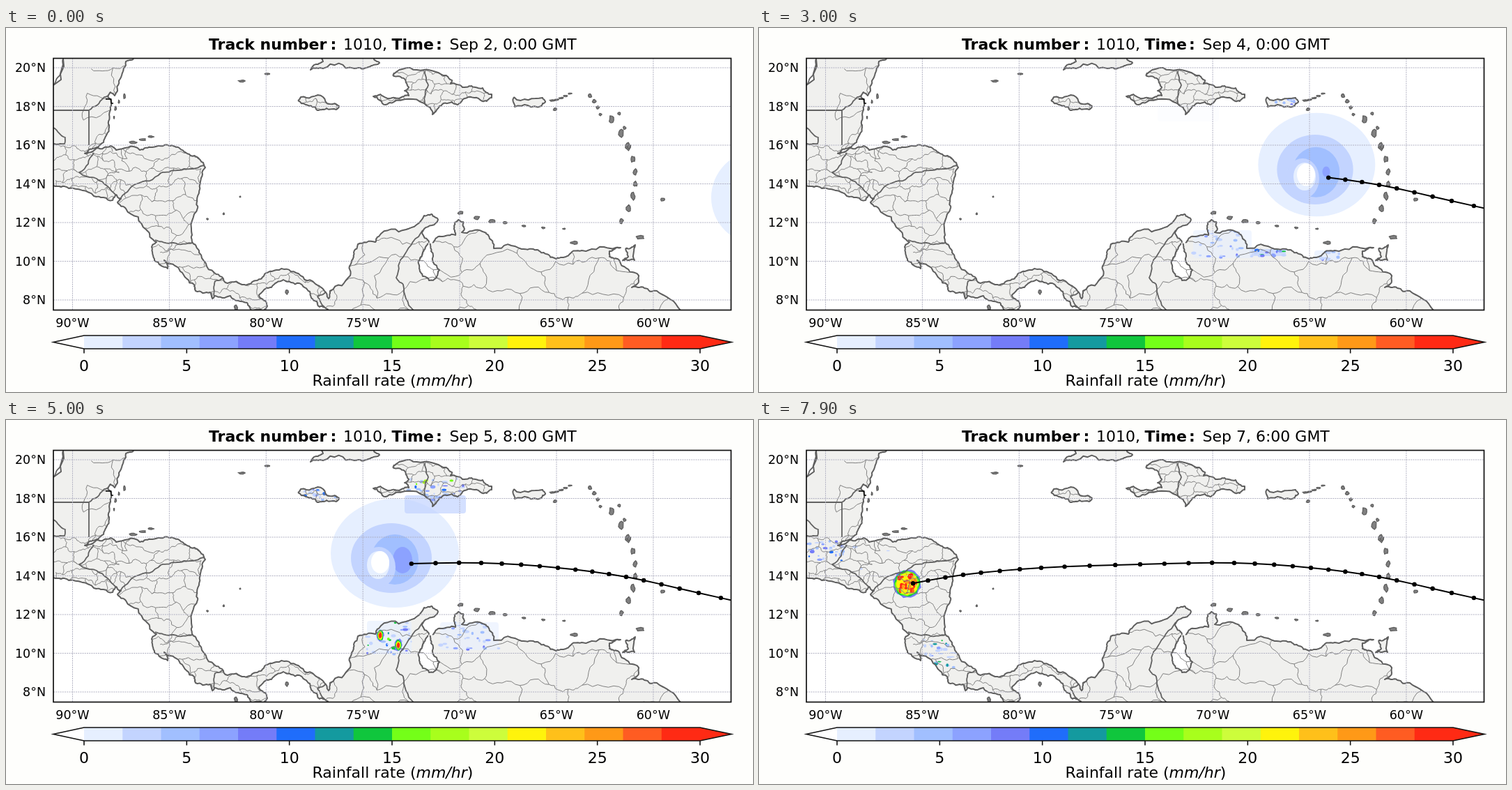
Animation of 1072 by 522 pixels, one loop 8000 ms. Source, as an HTML page with a canvas:

```html
<!DOCTYPE html>
<html lang="en">
<head>
<meta charset="utf-8">
<title>Rainfall along a storm track</title>
<style>
html, body { margin: 0; width: 100%; height: 100%; overflow: hidden; background: #fefefc; }
canvas { display: block; }
</style>
</head>
<body>
<canvas id="stage" width="1072" height="522"></canvas>
<script>
const ctx = document.getElementById("stage").getContext("2d");
const MAP = { x: 68, y: 43.5, w: 972.5, h: 361 };
const FONT = '"DejaVu Sans", sans-serif';
const RAMP = ["#e6efff", "#c3d4ff", "#a1bfff", "#8ca2ff", "#747cf8", "#1f6dfb", "#149a9f", "#10c63d",
  "#74ff18", "#a8fe1c", "#cdfd3b", "#fff30c", "#ffc01a", "#ff9917", "#ff5c22", "#ff2a14"];

// ---------- helpers ----------
function random(seed) {
  return () => {
    seed = (seed + 0x6D2B79F5) | 0;
    let t = Math.imul(seed ^ (seed >>> 15), 1 | seed);
    t ^= t + Math.imul(t ^ (t >>> 7), 61 | t);
    return ((t ^ (t >>> 14)) >>> 0) / 4294967296;
  };
}
const clamp = v => Math.min(1, Math.max(0, v));
const mix = (a, b, f) => a + (b - a) * f;
const ramp = (from, to, v) => clamp((v - from) / (to - from));
const points = text => text.trim().split(/\s+/).map(p => p.split(",").map(Number));

// Roughens a polyline by midpoint displacement; the given points stay put.
function roughen(pts, amount, rng, rounds = 3) {
  for (let r = 0; r < rounds; r++) {
    pts = pts.flatMap((p, i) => {
      if (!i) return [p];
      const q = pts[i - 1], k = (rng() - 0.5) * 2 * amount;
      return [[(p[0] + q[0]) / 2 - (p[1] - q[1]) * k, (p[1] + q[1]) / 2 + (p[0] - q[0]) * k], p];
    });
  }
  return pts;
}
function trace(path, pts, join) {
  pts.forEach(([x, y], i) => (i || join ? path.lineTo(x, y) : path.moveTo(x, y)));
}
function stroke(path, color, width) {
  ctx.strokeStyle = color;
  ctx.lineWidth = width;
  ctx.stroke(path);
}
function ellipse(x, y, rx, ry, color) {
  ctx.fillStyle = color;
  ctx.beginPath();
  ctx.ellipse(x, y, Math.max(0, rx), Math.max(0, ry), 0, 0, 7);
  ctx.fill();
}
// Closed ring with an uneven edge.
function ragged(path, x, y, rx, ry, rough, rng, corners = 16) {
  const ring = Array.from({ length: corners }, (_, i) => {
    const a = i * 2 * Math.PI / corners, k = 1 + (rng() - 0.5) * 2 * rough;
    return [x + rx * k * Math.cos(a), y + ry * k * Math.sin(a)];
  });
  trace(path, ring);
  path.closePath();
}

// ---------- geography ----------
const northCoast = `183,44 172,48 166,68 160,90 156,97 150,92 146,98 151,107 147,134 148,142 140,164 130,171
  113,180 124,177 130,172 150,169 158,175 192,175 210,171 234,169 247,171 265,183 283,193 286,200 279,220
  274,247 275,258 267,297 268,308 277,322 299,351 318,366 342,368 360,362 371,353 388,347 416,351 443,366
  459,379 463,388 465,377 494,355 496,334 499,322 505,310 530,307 535,299 574,289 600,269 611,267 620,275
  600,288 597,293 607,308`;
const southCoast = `612,308 624,299 645,297 643,284 649,275 656,278 658,288 654,293 684,292 692,297 700,316
  740,317 762,318 775,324 789,331 800,329 812,321 835,319 882,315 866,320 866,328 878,331 884,341 908,355
  907,366 898,372 916,373 934,377 968,405`;
const pacificCoast = `463,405 450,400 446,392 438,387 436,378 421,366 398,361 381,372 369,377 363,383 375,399
  370,405 353,405 346,394 322,384 299,384 296,388 293,379 272,377 270,368 250,349 231,337 227,333 232,345
  213,334 209,314 216,307 201,289 172,259 160,250 165,245 158,239 153,247 126,241 90,230 68,226`;
const lake = "608,309 610,320 622,347 618,358 607,362 598,356 593,345 594,330 600,318 606,309";
const largeIslands = [
  "453,44 455,48 445,52 437,60 455,58 500,58 520,56 536,50 528,44",
  `555,68 560,63 600,60 632,68 640,75 638,80 655,85 668,83 684,86 697,95 697,100 690,105 678,101 655,103
   648,110 640,106 622,112 612,124 600,108 555,107 545,110 527,98 537,95 568,99 578,97 572,90 578,85 572,73 555,68`,
  "419,104 423,99 455,99 478,112 474,117 460,115 448,118 443,113 430,110 419,104",
  "729,99 770,100 774,106 768,112 730,113 729,99",
  "889,316 903,311 902,333 885,333 893,328 889,316"
];
const frontiers = `68,118 119,118 119,168;68,143 85,157 84,166 68,166;82,44 78,66 68,82;119,118 140,100 147,97;
  126,179 105,207 130,216 158,240;162,246 186,224 222,208 246,204 284,197;214,304 240,308 268,308;
  299,385 300,363 312,359;459,379 447,385 457,400;598,290 572,325 560,358 570,368 585,405;601,62 606,82 601,108`;

const land = new Path2D(), coast = new Path2D(), water = new Path2D(), islets = new Path2D();
const borders = new Path2D(), districts = new Path2D();

function buildCoast(rng) {
  const rough = text => roughen(points(text), 0.17, rng);
  const west = points("68,82 79,74 78,66 83,55 82,44");
  [west, rough(northCoast), rough(southCoast), rough(pacificCoast)].forEach((chain, i) => {
    trace(land, chain, i > 0);
    trace(coast, chain);
  });
  land.closePath();
  for (const island of largeIslands.map(rough)) {
    trace(land, island);
    land.closePath();
    trace(coast, island);
  }
  const shore = rough(lake);
  trace(water, shore);
  trace(coast, shore);
  frontiers.split(";").forEach((line, i) => trace(borders, roughen(points(line), i ? 0.1 : 0, rng)));
}
// Islets strung along a quadratic curve.
function islandArc([ax, ay], [bx, by], [cx, cy], count, rx, ry, rng) {
  for (let i = 0; i < count; i++) {
    const t = i / (count - 1), u = 1 - t, k = 0.75 + rng() * 0.5;
    ragged(islets, u * u * ax + 2 * u * t * bx + t * t * cx, u * u * ay + 2 * u * t * by + t * t * cy,
      rx * k, ry * k, 0.3, rng, 9);
  }
}
function buildIslets(rng) {
  islandArc([869, 132], [930, 208], [883, 276], 9, 3, 4.5, rng);
  islandArc([838, 97], [848, 108], [853, 124], 4, 2.5, 2, rng);
  islandArc([784, 104], [797, 102], [809, 94], 5, 3, 1, rng);
  islandArc([652, 265], [690, 278], [716, 279], 4, 3.5, 2, rng);
  islandArc([743, 284], [770, 287], [801, 288], 3, 2, 1, rng);
  islandArc([339, 76], [357, 72], [375, 66], 2, 4.5, 1, rng);
  islandArc([183, 164], [196, 160], [208, 156], 3, 4, 1.3, rng);
  islandArc([170, 98], [156, 108], [155, 128], 4, 1, 2.5, rng);
  islandArc([880, 123], [888, 140], [894, 170], 3, 2.5, 2.5, rng);
  islandArc([815, 308], [865, 306], [910, 300], 2, 6, 2.5, rng);
  islandArc([289, 274], [312, 275], [336, 242], 3, 1, 1, rng);
  islandArc([330, 401], [365, 380], [403, 379], 2, 2, 3, rng);
  islandArc([788, 117], [900, 117], [942, 246], 2, 3.5, 2.5, rng);
}
// Net of irregular cells that stands for administrative districts.
function districtNet(x, y, w, h, size, rng) {
  const cols = Math.ceil(w / size), rows = Math.ceil(h / size);
  const jitter = () => (rng() - 0.5) * size * 0.75;
  const node = Array.from({ length: rows + 1 }, (_, r) => Array.from({ length: cols + 1 }, (_, c) =>
    [x + c * size + jitter(), y + r * size + jitter()]));
  for (let r = 0; r <= rows; r++) {
    for (let c = 0; c <= cols; c++) {
      if (c < cols) trace(districts, roughen([node[r][c], node[r][c + 1]], 0.22, rng));
      if (r < rows && (r + c) % 2) trace(districts, roughen([node[r][c], node[r + 1][c]], 0.22, rng));
    }
  }
}
buildCoast(random(11));
buildIslets(random(4));
{
  const rng = random(23);
  districtNet(68, 172, 82, 70, 15, rng);
  districtNet(150, 180, 130, 125, 22, rng);
  districtNet(215, 318, 240, 80, 21, rng);
  districtNet(470, 300, 470, 105, 37, rng);
  districtNet(418, 64, 275, 55, 14, rng);
  districtNet(120, 66, 34, 100, 30, rng);
}

// ---------- storm ----------
// Key positions, eight steps apart, joined by a smooth curve.
const track = points("1115,275 994,248 890,225 792,212 682,205 547,207 405,212 293,222 206,237");
function trackAt(step) {
  const n = Math.min(Math.floor(step / 8), track.length - 2), t = step / 8 - n;
  const key = i => track[Math.min(Math.max(i, 0), track.length - 1)];
  const [a, b, c, d] = [key(n - 1), key(n), key(n + 1), key(n + 2)];
  return [0, 1].map(k => b[k] + 0.5 * t * (c[k] - a[k] +
    t * (2 * a[k] - 5 * b[k] + 4 * c[k] - d[k] + t * (3 * (b[k] - c[k]) + d[k] - a[k]))));
}
function drawStorm(step) {
  const [x, y] = trackAt(step);
  const entry = 1 - ramp(0, 8, step), young = ramp(8, 18, step), grown = ramp(8, 32, step);
  const size = 1 - ramp(50, 60, step) ** 2;
  const core = ramp(20, 30, step) * (1 - ramp(41, 48, step));
  const disc = (dx, dy, rx, ry, level) =>
    ellipse(x + dx * size, y + dy * size, rx * size, ry * size, RAMP[level] || "#fff");

  disc(mix(3, 11, grown) - 38 * entry, -16 - 16 * entry, mix(68, 92, grown), mix(67, 78, grown), 0);
  disc(mix(1, 6, young), -9, mix(48, 58, grown), mix(52, 50, young), 1);
  disc(mix(0, 11, grown), mix(-2, -7, grown), mix(45, 34, young), mix(44, 36, young), 2);
  disc(22, -6, 14 * core, 19 * core, 3);
  disc(-12, mix(15, 4, young), mix(33, 24, young), mix(32, 29, young), 1);
  disc(mix(-1, -13, grown), 1, mix(26, 16, young), mix(27, 20, young), 0);
  disc(mix(-1, -10, grown), mix(1, -3, grown), mix(23, 13, young), mix(23, 16, young));
}

// ---------- rain on land ----------
// Each place is wet while the storm passes at a middle distance: centre, half size, top level, haze.
const places = [
  [752, 106, 18, 6, 4, 0], [815, 326, 18, 7, 6, 1], [730, 322, 26, 5, 8, 1], [665, 310, 42, 20, 5, 1],
  [612, 98, 46, 14, 11, 0], [616, 121, 44, 13, 3, 1], [550, 312, 32, 24, 15, 1], [452, 109, 26, 9, 7, 0],
  [260, 235, 24, 66, 3, 1], [262, 335, 27, 20, 7, 0], [95, 188, 27, 14, 5, 0], [165, 195, 30, 20, 6, 0]
];
function drawLandRain(step) {
  const [sx, sy] = trackAt(step);
  places.forEach(([x, y, rx, ry, top, haze], i) => {
    const wet = clamp(1.3 - Math.abs(Math.hypot(x - sx, y - sy) - 130) / 55), rng = random(70 + i);
    if (!wet) return;
    if (haze) {
      ctx.globalAlpha = wet * 0.75;
      ctx.fillStyle = RAMP[rx > ry * 3 ? 1 : 0];
      ctx.beginPath();
      ctx.roundRect(x - rx, y - ry, rx * 2, ry * 2, 4);
      ctx.fill();
      ctx.globalAlpha = 1;
    }
    ctx.save();
    ctx.clip(land);
    const drops = wet * Math.sqrt(rx * ry) * 1.6;
    for (let n = 0; n < drops; n++) {
      const px = x + (rng() * 2 - 1) * rx, py = y + (rng() * 2 - 1) * ry;
      const level = Math.floor(1 + Math.min(top, 9) * wet * rng() ** 2.5);
      ellipse(px, py, 1 + rng() * 3, 0.8 + rng() * 1.7, RAMP[level]);
    }
    if (top > 12) for (const side of [-1, 1]) drawCell(x + side * 13, y + side * 7 + 4, 6 * wet, 11 * wet, top, rng);
    ctx.restore();
  });
}
function drawCell(x, y, rx, ry, top, rng) {
  const levels = [4, 7, 8, 11, 15].filter(level => level <= top);
  levels.forEach((level, n) => {
    const path = new Path2D(), k = 1 - n / levels.length * 0.7;
    ragged(path, x, y, rx * k, ry * k, 0.15, rng);
    ctx.fillStyle = RAMP[level];
    ctx.fill(path);
  });
}
// After landfall the storm itself becomes one intense cell.
function drawLandfall(step) {
  if (step < 57) return;
  const [x, y] = trackAt(step), rng = random(9);
  ctx.save();
  ctx.clip(land);
  [4, 7, 8, 11].forEach((level, n) => {
    const path = new Path2D();
    ragged(path, x, y - 1, 20 - n * 1.5, 20 - n * 1.5, 0.07, rng, 24);
    ctx.fillStyle = RAMP[level];
    ctx.fill(path);
  });
  for (let i = 0; i < 50; i++) {
    const a = rng() * 2 * Math.PI, r = Math.sqrt(rng()) * 14;
    ellipse(x + r * Math.cos(a), y - 1 + r * Math.sin(a), 1 + rng() * 2, 1 + rng() * 3, RAMP[i % 2 ? 15 : 10 + i % 5]);
  }
  ctx.restore();
}

// ---------- drawing ----------
function label(text, x, y, size, align = "left", style = "") {
  ctx.font = `${style} ${size}px ${FONT}`;
  ctx.textAlign = align;
  ctx.fillStyle = "#000";
  ctx.fillText(text, x, y);
}
const lonX = west => 95.5 + (90 - west) * 27.78;
const latY = north => 57 + (20 - north) * 27.75;
const meridians = [90, 85, 80, 75, 70, 65, 60], parallels = [20, 18, 16, 14, 12, 10, 8];

function drawGrid() {
  const grid = new Path2D();
  for (const w of meridians) trace(grid, [[lonX(w), MAP.y], [lonX(w), 405]]);
  for (const n of parallels) trace(grid, [[MAP.x, latY(n)], [1041, latY(n)]]);
  ctx.setLineDash([2, 1.2]);
  stroke(grid, "#aaaabd", 0.9);
  ctx.setLineDash([]);
}
// A dot every second step; the first lies beyond the map edge.
function drawTrack(step) {
  const last = Math.ceil(step / 2) * 2 - 2;
  if (last < 6) return;
  const shown = [];
  for (let s = 4; s <= last; s += 2) shown.push(trackAt(s));
  const path = new Path2D();
  trace(path, shown);
  stroke(path, "#000", 2);
  for (const [x, y] of shown) ellipse(x, y, 3.2, 3.2, "#000");
}
function drawMap(step) {
  ctx.save();
  ctx.beginPath();
  ctx.rect(MAP.x, MAP.y, MAP.w, MAP.h);
  ctx.clip();
  ctx.fillStyle = "#fff";
  ctx.fill();
  drawStorm(step);
  ctx.fillStyle = "#f0f0ee";
  ctx.fill(land);
  ctx.fillStyle = "#fff";
  ctx.fill(water);
  drawLandRain(step);
  drawLandfall(step);

  ctx.lineJoin = "round";
  ctx.save();
  ctx.clip(land);
  stroke(districts, "#808080", 1);
  ctx.restore();
  stroke(borders, "#626262", 1.8);
  stroke(coast, "#5e5e5e", 2);
  ctx.fillStyle = "#808080";
  ctx.fill(islets);
  stroke(islets, "#5c5c5c", 1.2);
  stroke(new Path2D("M143 102H151V108H154"), "#000", 1.3);
  drawGrid();
  drawTrack(step);
  ctx.restore();

  ctx.strokeStyle = "#111";
  ctx.lineWidth = 1.7;
  ctx.strokeRect(MAP.x, MAP.y, MAP.w, MAP.h);
  for (const w of meridians) label(w + "°W", lonX(w), 429, 17.5, "center");
  for (const n of parallels) label(n + "°N", 57, latY(n) + 6.2, 17.5, "right");
}

function drawTitle(step) {
  const hours = step * 2, hour = hours % 24;
  const x = hour > 9 ? 284 : 291, y = 30.5;
  label("Track number", x, y, 22, "left", "bold");
  label(":", x + 174.5, y, 22, "left", "bold");
  label("1010,", x + 193, y, 22);
  label("Time", x + 262.5, y, 22, "left", "bold");
  label(":", x + 326, y, 22, "left", "bold");
  label(`Sep ${2 + Math.floor(hours / 24)}, ${hour}:00 GMT`, x + 345.5, y, 22);
}

function drawScale() {
  const left = 112, right = 996, top = 441, bottom = 460, width = (right - left) / RAMP.length;
  const outline = new Path2D("M68 450.5L112 441H996L1041 450.5L996 460H112Z");
  ctx.fillStyle = "#fff";
  ctx.fill(outline);
  ctx.save();
  ctx.clip(outline);
  RAMP.forEach((color, i) => {
    ctx.fillStyle = color;
    ctx.fillRect(left + i * width, top, 1041 - left - i * width, bottom - top);
  });
  ctx.restore();
  ctx.lineJoin = "miter";
  stroke(outline, "#111", 1.6);
  for (let v = 0; v <= 30; v += 5) {
    const x = left + v * (right - left) / 30;
    stroke(new Path2D(`M${x} ${bottom}v6.5`), "#111", 1.6);
    label(v, x, 492, 22, "center");
  }
  let x = 439.5;
  for (const [text, style] of [["Rainfall rate (", ""], ["mm/hr", "italic"], [")", ""]]) {
    label(text, x, 513, 22, "left", style);
    x += ctx.measureText(text).width;
  }
}

// Every fifth tenth of a second holds the previous step.
function stepAt(ms) {
  const tick = Math.floor((ms % 8000) / 100);
  return tick - Math.floor((tick + 3) / 5);
}
let drawn = -1;
function frame() {
  const step = stepAt(performance.now());
  if (step !== drawn) {
    drawn = step;
    ctx.fillStyle = "#fefefc";
    ctx.fillRect(0, 0, 1072, 522);
    drawMap(step);
    drawTitle(step);
    drawScale();
  }
  requestAnimationFrame(frame);
}
frame();
</script>
</body>
</html>
```
